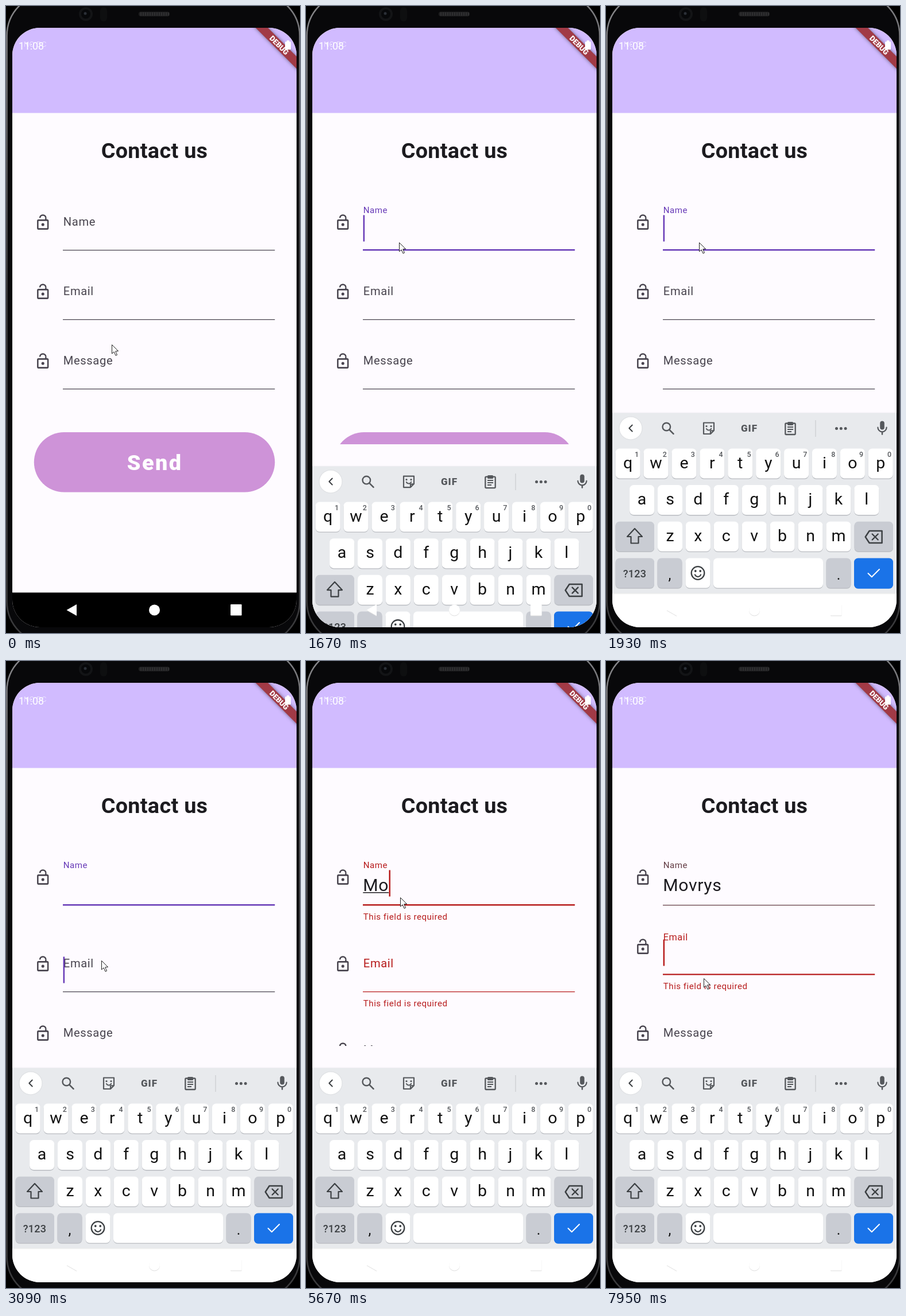
An HTML page with a canvas for the animation above (8 s loop, 512x1093 px).

```html
<!DOCTYPE html>
<html lang="en">
<head>
<meta charset="utf-8">
<title>Contact form</title>
<style>
html, body { margin: 0; width: 100%; height: 100%; overflow: hidden; background: #000; }
canvas { display: block; }
</style>
</head>
<body>
<canvas id="stage" width="512" height="1093"></canvas>
<script>
const ctx = document.getElementById('stage').getContext('2d');
const LOOP = 8000, STEP = 127, BLINK = 460;
const DP = 495 / 393, EDGE = 30 * DP, TEXT_X = 99.8, LINE_X = 99, RIGHT = 506 - EDGE;
const FIELD_GAP = 121, ERROR_ROW = 30, KEYS_H = 314;
const INK = '#1c1b1f', KEY_INK = '#55585c', DARK = '#3c4043', RULE = '#c3c6ca';
const GREY = [73, 69, 79], PURPLE = [103, 58, 183], RED = [183, 28, 28];

// Moments when the focus moves: name, email, name again, email again.
const OPEN = 1660, LEAVE = 3090, BACK = 4400, NEXT = 7950;
const TYPED = 'Movrys', TYPE_START = 5485, TYPE_TIME = 1120;
const GUESSES = ['Movlir', 'Movliry'];
// Pointer strokes: start, steps, end point.
const STROKES = [[520, 2, 196, 514], [790, 5, 162, 412], [2220, 4, 166, 522], [3550, 5, 164, 412], [7410, 3, 170, 553]];

const clamp = p => Math.max(0, Math.min(1, p));
const mix = (a, b, k) => a + (b - a) * k;
const blend = (a, b, k) => `rgb(${a.map((v, i) => Math.round(mix(v, b[i], k)))})`;
const easeOut = (p, power) => 1 - (1 - p) ** power;
// Progress in n held steps from a start time.
const stepped = (t, start, n) => clamp((Math.floor((t - start) / STEP) + 1) / n);
// A quick transition: partly done on its first step, complete on the next.
const settle = (t, start, first) => t < start ? 0 : clamp(first + Math.floor((t - start) / STEP));

function text(str, x, y, size, color, { weight = 400, gap = 0, align = 'left' } = {}) {
  ctx.font = `${weight} ${size}px Roboto, sans-serif`;
  ctx.letterSpacing = gap + 'px';
  ctx.textAlign = align;
  ctx.fillStyle = color;
  ctx.fillText(str, x, y);
}
function box(x, y, w, h, color, r = 0) {
  ctx.fillStyle = color;
  ctx.beginPath();
  ctx.roundRect(x, y, w, h, r);
  ctx.fill();
}
function frame(x, y, w, h, r, color, width) {
  ctx.strokeStyle = color;
  ctx.lineWidth = width;
  ctx.beginPath();
  ctx.roundRect(x, y, w, h, r);
  ctx.stroke();
}
function disc(x, y, r, color) {
  ctx.fillStyle = color;
  ctx.beginPath();
  ctx.arc(x, y, r, 0, 7);
  ctx.fill();
}
function ring(x, y, r, color, width, from = 0, to = 7) {
  ctx.strokeStyle = color;
  ctx.lineWidth = width;
  ctx.beginPath();
  ctx.arc(x, y, r, from, to);
  ctx.stroke();
}
function trace(points, close) {
  ctx.beginPath();
  points.forEach(([x, y]) => ctx.lineTo(x, y));
  if (close) ctx.closePath();
}
function line(points, color, width, close) {
  ctx.strokeStyle = color;
  ctx.lineWidth = width;
  trace(points, close);
  ctx.stroke();
}
function shadow(alpha, blur, paint) {
  ctx.shadowColor = `rgba(0,0,0,${alpha})`;
  ctx.shadowBlur = blur;
  paint();
  ctx.shadowColor = 'transparent';
}

function phone() {
  box(0, 0, 512, 1093, '#000');
  const rim = ctx.createLinearGradient(0, 0, 60, 500);
  rim.addColorStop(0, '#858588');
  rim.addColorStop(1, '#3a3a3c');
  box(1.5, -22, 510, 1134, '#08080a', 74);
  frame(1.5, -22, 510, 1134, 74, rim, 2.6);
  disc(139, 14, 12, '#131416');
  disc(139, 14, 8, '#07080a');
  disc(138, 13, 2.5, '#2b2f37');
  box(164, 2, 12, 25, '#0e0f10', 6);
  box(231, 10, 54, 8, '#202022', 4);
  for (let x = 234; x < 283; x += 4) box(x, 11, 2, 6, '#303032', 1);
}

function topBar() {
  box(11, 38, 495, 148.5, '#d1bbff');
  text('11:08', 22, 75.5, 17.6, '#fff');
  text('NO DC', 31, 71, 13, 'rgba(255,255,255,.8)', { weight: 300, gap: .3 });
  ctx.save();
  ctx.translate(506, 38);
  ctx.rotate(Math.PI / 4);
  shadow(.5, 6, () => box(-90, 28 * DP, 180, 12 * DP, '#a13a46'));
  text('DEBUG', 0, 34 * DP + 4.6, 12.85, '#fff', { weight: 900, align: 'center' });
  ctx.restore();
  box(486, 62, 10, 14, '#fff', 1.5);
  box(489, 60, 4, 3, '#fff');
}

function lock(cy) {
  const color = blend(GREY, GREY, 0);
  ctx.save();
  ctx.translate(64.2, cy);
  ctx.scale(1.27, 1.27);
  frame(-7, -3, 14, 12, 1, color, 2);
  ring(0, -6, 4.05, color, 2, Math.PI, 0);
  line([[4.05, -6], [4.05, -3]], color, 2);
  disc(0, 3, 2, color);
  ctx.restore();
}

function field(label, dy, { focus = 0, lifted = focus, error = 0, note = error } = {}) {
  const size = mix(1, .75, lifted), weight = 1 + focus;
  const color = blend(focus > 0 ? PURPLE : GREY, RED, error);
  lock(377.2 + dy);
  text(label, TEXT_X, mix(383.4, 360.5, lifted) + dy, 16 * DP * size, color, { gap: .63 * size });
  box(LINE_X, 426 - weight + dy, RIGHT - LINE_X, weight * 1.3, color);
  ctx.globalAlpha = note;
  text('This field is required', TEXT_X, 450.8 - 5 * (1 - note) + dy, 12 * DP, blend(RED, RED, 0), { gap: .5 });
  ctx.globalAlpha = 1;
}

function form(t, typed, bottom) {
  ctx.save();
  ctx.beginPath();
  ctx.rect(11, 186, 495, bottom - 186);
  ctx.clip();
  text('Contact us', 258.5, 265, 30 * DP, INK, { weight: 700, gap: .3, align: 'center' });

  const left = settle(t, LEAVE, 0), back = settle(t, BACK, .38), next = settle(t, NEXT, .77);
  const nameRow = t >= LEAVE && t < NEXT, emailRow = t >= BACK;
  const emailY = FIELD_GAP + nameRow * ERROR_ROW;
  const focus = t < NEXT ? settle(t, OPEN, 1) - left + back : 0;
  field('Name', 0, { focus, lifted: typed ? 1 : focus, error: left - next, note: nameRow ? left : 0 });
  field('Email', emailY, { focus: left - back + next, error: back });
  field('Message', 2 * FIELD_GAP + (nameRow + emailRow) * ERROR_ROW);

  let width = 0;
  if (typed) {
    text(typed, LINE_X + .3, 401, 24 * DP, INK, { gap: .63 });
    width = ctx.measureText(typed).width;
    if (t < NEXT) box(LINE_X + .3, 403, width, 1.6, INK);
  }

  // The caret restarts its blink on every focus change and key press.
  const lastKey = Math.min(t, TYPE_START + TYPE_TIME);
  const restart = [OPEN, LEAVE, BACK, t > TYPE_START ? lastKey : 0, NEXT].filter(m => m <= t);
  const lit = Math.floor((t - Math.max(...restart)) / BLINK) % 2 === 0;
  if (t >= OPEN && lit) {
    const inEmail = t >= NEXT || (t >= LEAVE && t < BACK);
    box(LINE_X + .6 + (inEmail ? 0 : width), 364.5 + (inEmail ? emailY : 0), 2.5, 46,
      blend(PURPLE, RED, +(t >= BACK)));
  }

  box(11 + EDGE, 743, RIGHT - 11 - EDGE, 104.6, '#ce93d8', 52.3);
  text('Send', 259.2, 809, 30 * DP, '#fff', { weight: 900, gap: 2.5, align: 'center' });
  ctx.restore();
}

function toolbar(hints) {
  ctx.lineCap = ctx.lineJoin = 'round';
  shadow(.15, 2, () => disc(43, 736, 19.5, '#fff'));
  const d = hints ? 2.7 : -2.7;
  line([[43 - d, 730.5], [43 + d, 736], [43 - d, 741.5]], DARK, 2);

  box(477.2, 723.5, 7.6, 15, KEY_INK, 3.8);
  ring(481, 734.7, 7.6, KEY_INK, 2.2, 0, Math.PI);
  line([[481, 743], [481, 746.5]], KEY_INK, 2.5);

  if (hints) {
    hints.forEach((h, i) => {
      text(h, 121.5 + 135.7 * i, 745.5, 23, '#46494d', { align: 'center' });
      if (i) box(42 + 143.5 * i, 722, 1, 29, RULE);
    });
    return;
  }
  ring(105.3, 733.5, 6.8, KEY_INK, 2.4);
  line([[110.5, 738.8], [117.5, 745.8]], KEY_INK, 2.6);

  line([[182, 746], [170, 746], [170, 726.5], [188, 726.5], [188, 740], [182, 746], [182, 740.5], [188, 740]], KEY_INK, 2.2);
  disc(175, 732.5, 1.6, KEY_INK);
  disc(183, 732.5, 1.6, KEY_INK);
  ring(179, 735, 4.5, KEY_INK, 2, .4, 2.7);

  text('GIF', 249.5, 742, 17, KEY_INK, { weight: 900, gap: 1, align: 'center' });

  frame(312.3, 727.5, 17.4, 19.5, 1.5, KEY_INK, 2.3);
  box(316, 725, 10, 6, KEY_INK, 1.5);
  for (let y = 733; y < 742; y += 4) box(316, y, y < 740 ? 10 : 7, 2, KEY_INK);

  box(364.5, 722, 1, 29, RULE);
  for (let i = -1; i < 2; i++) disc(409.3 + 7.8 * i, 736.5, 2.5, KEY_INK);
}

function key(x, row, w, color = '#fff', lip = '#b9bcc1') {
  const y = 771.4 + 63.7 * row;
  box(x, y + 1.3, w, 52, lip, 7);
  box(x, y, w, 52, color, 7);
}

function keyboard(dy, hints) {
  const MUTED = '#c9ccd3', BLUE = '#1a73e8', BLACK = '#111';
  const center = { align: 'center' };
  ctx.save();
  ctx.translate(0, dy);
  shadow(.18, 3, () => box(11, 709.5, 495, KEYS_H, '#e8eaed'));
  toolbar(hints);

  ['qwertyuiop', 'asdfghjkl', 'zxcvbnm'].forEach((chars, row) => {
    [...chars].forEach((c, i) => {
      const x = 258.2 + 48.9 * (i - (chars.length - 1) / 2);
      key(x - 21.5, row, 43);
      text(c, x, 805.5 + 63.5 * row, 28.5, BLACK, center);
      if (!row) text((i + 1) % 10, x + 15.3, 785.5, 12.5, KEY_INK, { weight: 500, align: 'center' });
    });
  });

  for (const row of [2, 3]) key(16.5, row, 67.5, MUTED);
  line([[50, 911], [63, 925], [56.5, 925], [56.5, 936.5], [43.5, 936.5], [43.5, 925], [37, 925]], DARK, 2.2, true);
  text('?123', 50, 995.5, 18, DARK, { weight: 500, gap: .3, align: 'center' });

  key(432.5, 2, 67.5, MUTED);
  line([[451.7, 925.5], [458.6, 915], [480.6, 915], [480.6, 936], [458.6, 936]], DARK, 2.5, true);
  for (const s of [-5, 5]) line([[468.7 - s, 920.5], [468.7 + s, 930.5]], DARK, 2.4);

  for (const [x, mark] of [[89.5, ','], [383.5, '.']]) {
    key(x, 3, 43, MUTED);
    text(mark, x + 21.5, 1000, 25, BLACK, center);
  }
  key(138.5, 3, 43);
  ring(160, 988.5, 11.3, DARK, 2.3);
  for (const s of [-4.2, 4.2]) disc(160 + s, 985, 1.9, DARK);
  ring(160, 989.5, 5.4, DARK, 2.1, .35, 2.79);
  key(187, 3, 191);
  key(432, 3, 68, BLUE, BLUE);
  line([[456.5, 989], [462.8, 995.2], [476, 982]], '#fff', 2);
  ctx.restore();
}

function navIcons(dy, color) {
  ctx.fillStyle = color;
  trace([[105.5, 1053 + dy], [123, 1043 + dy], [123, 1063 + dy]]);
  ctx.fill();
  disc(258.5, 1053 + dy, 9.5, color);
  box(391, 1043 + dy, 19.5, 19.5, color, 1);
}

function pointer(t) {
  let x = 184, y = 590;
  for (const [start, n, endX, endY] of STROKES) {
    const p = easeOut(stepped(t, start, n), 2);
    x = mix(x, endX, p);
    y = mix(y, endY, p);
  }
  ctx.save();
  ctx.translate(Math.round(x) + .5, Math.round(y) + .5);
  trace([[0, 0], [0, 15.5], [3.6, 12.3], [6.5, 18.8], [9, 17.7], [6.2, 11.4], [11, 11]], true);
  ctx.fillStyle = '#fff';
  ctx.fill();
  ctx.strokeStyle = '#222';
  ctx.lineWidth = 1;
  ctx.stroke();
  ctx.restore();
}

function draw(t) {
  const open = t >= OPEN;
  const rise = KEYS_H * (1 - easeOut(stepped(t, OPEN, 3), 3));
  // Typing slows down towards the end of the word.
  const typed = TYPED.slice(0, Math.floor(TYPED.length * Math.sqrt(clamp((t - TYPE_START) / TYPE_TIME))));
  const hints = typed.length > 2 && t < NEXT ? [typed, ...GUESSES] : null;

  phone();
  ctx.save();
  ctx.beginPath();
  ctx.roundRect(11, 38, 495, 1045, 48);
  ctx.clip();
  box(11, 38, 495, 1045, '#fefbff');
  form(t, typed, open ? 671 + rise : 1022);
  topBar();
  box(11, 1022.5, 495, 61, open ? '#fff' : '#000');
  if (open) {
    keyboard(rise, hints);
    navIcons(1, '#dedede');
  }
  navIcons(0, '#fff');
  ctx.restore();
  pointer(t);
}

let begin;
function tick(now) {
  begin ??= now;
  draw((now - begin) % LOOP);
  requestAnimationFrame(tick);
}
requestAnimationFrame(tick);
</script>
</body>
</html>
```
